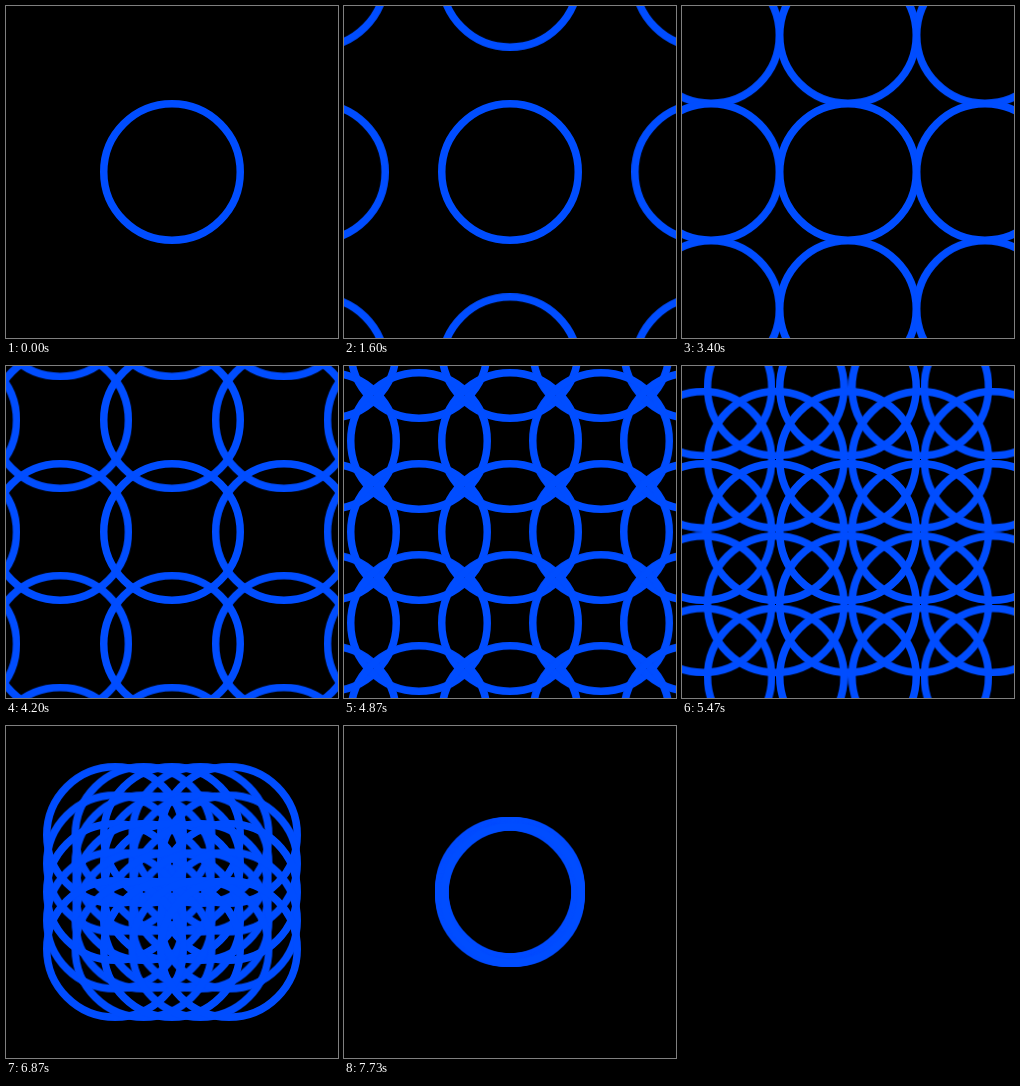
An HTML page for the animation above (7.79 s loop, 332 by 332 pixels).

```html
<!DOCTYPE html>
<html lang="en">
<head>
<meta charset="utf-8">
<title>Converging rings</title>
<style>
  html, body {
    margin: 0;
    width: 100%;
    height: 100%;
    overflow: hidden;
    background: #000;
  }
  svg {
    display: block;
    width: 100vw;
    height: 100vh;
  }
  circle {
    fill: none;
    stroke: #004dff;
    stroke-width: 7.5px;
    animation: converge 7790ms steps(117, end) infinite;
  }
  /* --col and --row run from -2 to 2; the grid pitch shrinks evenly */
  @keyframes converge {
    from { transform: translate(calc(var(--col) * 243.2px), calc(var(--row) * 243.2px)); }
    to   { transform: translate(calc(var(--col) * -0.7px), calc(var(--row) * -0.7px)); }
  }
</style>
</head>
<body>
<svg id="stage" viewBox="0 0 332 332"></svg>
<script>
  const stage = document.getElementById('stage');
  const reach = 2;

  function addRing(col, row) {
    const ring = document.createElementNS('http://www.w3.org/2000/svg', 'circle');
    ring.setAttribute('cx', 166);
    ring.setAttribute('cy', 166);
    ring.setAttribute('r', 68.25);
    ring.style.setProperty('--col', col);
    ring.style.setProperty('--row', row);
    stage.append(ring);
  }

  for (let row = -reach; row <= reach; row++) {
    for (let col = -reach; col <= reach; col++) addRing(col, row);
  }
</script>
</body>
</html>
```
